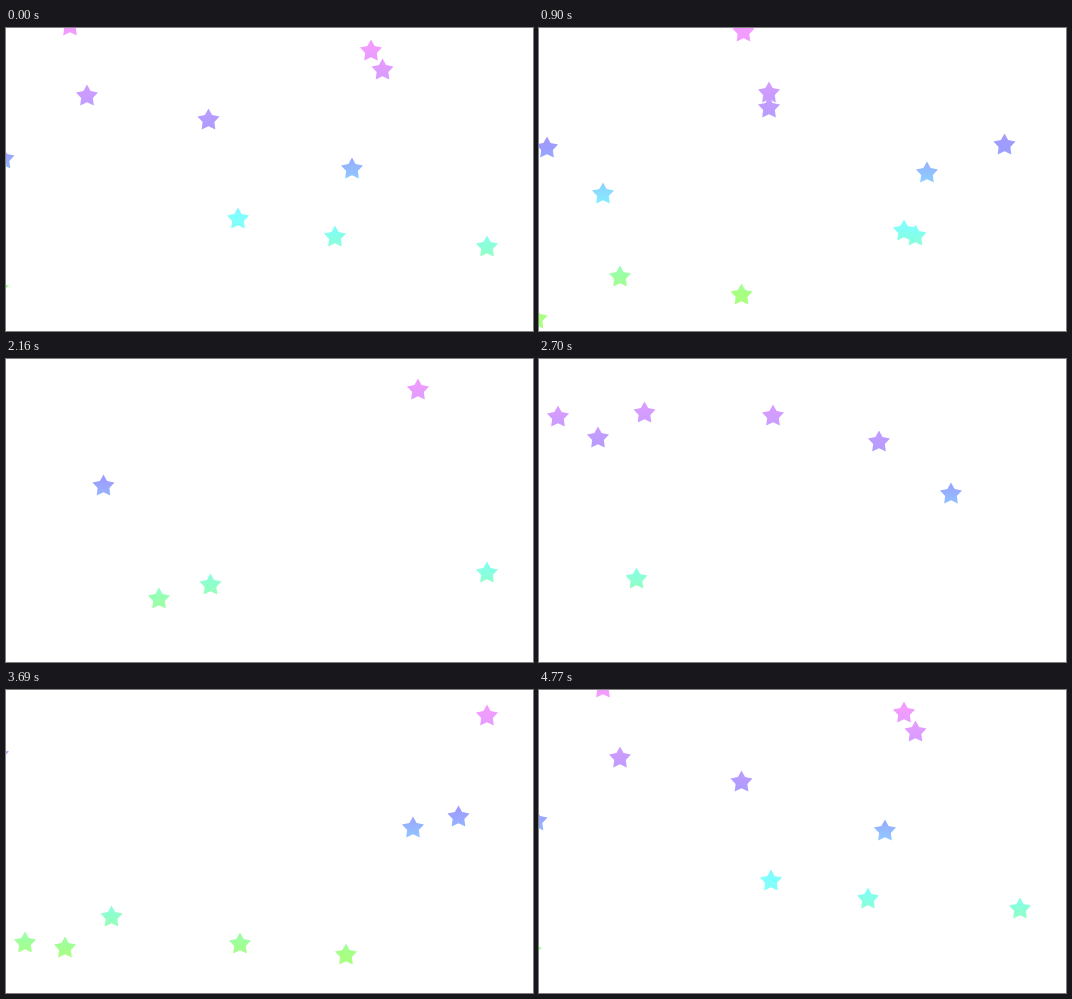
An HTML page with a canvas for the animation above (4860 ms loop, 527x303 px).

```html
<!DOCTYPE html>
<html lang="en">
<head>
<meta charset="utf-8">
<title>Falling stars</title>
<style>
  html, body { margin: 0; width: 100%; height: 100%; overflow: hidden; background: #fff; }
  canvas { display: block; }
</style>
</head>
<body>
<canvas id="sky" width="527" height="303"></canvas>
<script>
const W = 527, H = 303, MIDDLE = 150;
const STEP = 90, TICKS = 54, CYCLE = 53; // the last tick repeats the first pose
const RADIUS = 11.6, INNER = 0.53;
const SLOWEST = 15.5, FASTEST = 18.7; // pixels per tick

// One key point per star, slowest star first: [x, tick at which it passes the middle]
const passes = [
  [97.5, 25.5], [105.5, 36.1], [204.5, 19.2], [-2.5, 1.2], [481, 48.7], [59, 34.35], [-8, 46.2],
  [340, 34.05], [376.5, 6.5], [64, 9.05], [407, 41.7], [481, 20.25], [465.5, 11.9], [388, 10.3],
  [412, 30.85], [202.5, 3.3], [346, 0.5], [232, 50.7], [19, 35.2], [234, 35.2], [365, 7.05],
  [81, 4.55], [153, 19.05], [329, 49.75], [452.5, 42.25], [230, 14.6], [230, 13.75], [8, 11.6]
];

const stars = passes.map(([x, pass], i) => {
  const rank = i / (passes.length - 1);
  return { x, pass, speed: SLOWEST + (FASTEST - SLOWEST) * rank ** 0.85 };
});

const ctx = document.getElementById("sky").getContext("2d");

// Colour depends only on height on the stage
const rainbow = ctx.createLinearGradient(0, 0, 0, H);
rainbow.addColorStop(20 / H, "#f29cff");
rainbow.addColorStop(120 / H, "#9c9cff");
rainbow.addColorStop(187 / H, "#80ffff");
rainbow.addColorStop(200 / H, "#80fff8");
rainbow.addColorStop(267 / H, "#a8ff80");

function addStar(x, y) {
  for (let i = 0; i < 10; i++) {
    const r = i % 2 ? RADIUS * INNER : RADIUS;
    const a = i * Math.PI / 5 - Math.PI / 2;
    const px = x + r * Math.cos(a), py = y + r * Math.sin(a);
    if (i) ctx.lineTo(px, py); else ctx.moveTo(px, py);
  }
  ctx.closePath();
}

function draw(time) {
  const tick = Math.floor(time / STEP) % TICKS % CYCLE;
  ctx.clearRect(0, 0, W, H);
  ctx.fillStyle = rainbow;
  ctx.beginPath();
  for (const { x, pass, speed } of stars) {
    const since = (tick - pass + CYCLE * 1.5) % CYCLE - CYCLE / 2;
    addStar(x, Math.round(MIDDLE + speed * since));
  }
  ctx.fill();
}

let start;
function loop(now) {
  start ??= now;
  draw(now - start);
  requestAnimationFrame(loop);
}
draw(0);
requestAnimationFrame(loop);
</script>
</body>
</html>
```
